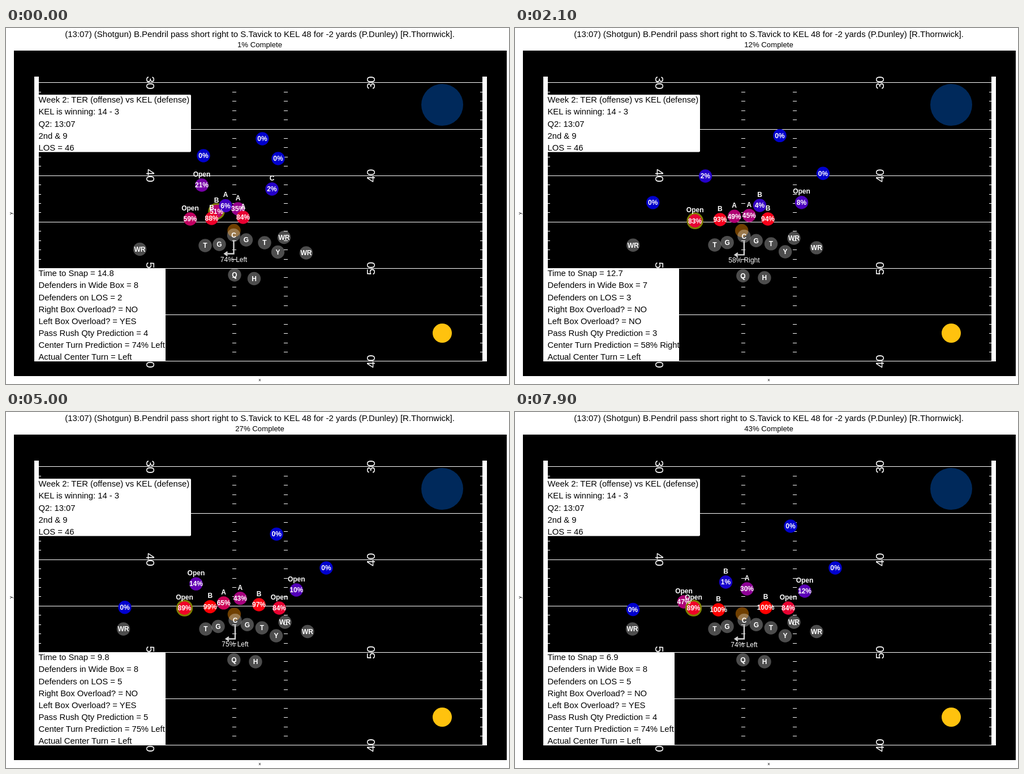
Recreate the animation shown at these times as an HTML page. Size 889x630 px, loop 8000 ms.

```html
<!DOCTYPE html>
<html lang="en">
<head>
<meta charset="utf-8">
<title>Pass rush prediction</title>
<style>
  html, body { margin: 0; width: 100%; height: 100%; overflow: hidden; background: #fff; }
  svg { display: block; width: 889px; height: 630px; }
  text { font-family: "Liberation Sans", Arial, sans-serif; }
  .mid { text-anchor: middle; }
  .info { font-size: 14.8px; white-space: pre; }
  .yard { font-size: 21px; fill: #fff; text-anchor: middle; }
  .axis { font-size: 8px; text-anchor: middle; }
  .tag { font-size: 12px; font-weight: bold; fill: #fff; text-anchor: middle; }
  .turn { font-size: 12px; fill: #fff; text-anchor: middle; }
  .lines { stroke: #fff; fill: none; }
</style>
</head>
<body>
<svg viewBox="0 0 889 630">
  <text class="mid" x="448.5" y="16" font-size="15">(13:07) (Shotgun) B.Pendril pass short right to S.Tavick to KEL 48 for -2 yards (P.Dunley) [R.Thornwick].</text>
  <text id="progress" class="mid" x="448.5" y="33.5" font-size="13.2"></text>
  <rect x="14" y="40" width="871" height="576"/>
  <path d="M50 86h8v504h-8zM842 86h8v504h-8z" fill="#fff"/>
  <g id="field"></g>
  <circle cx="771" cy="136" r="37" fill="#00295b"/>
  <circle cx="771" cy="540" r="17" fill="#ffc20e"/>
  <g id="panels"></g>
  <g id="discs"></g>
  <g id="labels"></g>
  <text class="axis" x="448.5" y="625">x</text>
  <text class="axis" transform="translate(11 328) rotate(-90)">y</text>
</svg>
<script>
const $ = id => document.getElementById(id);
const field = $('field'), panels = $('panels'), discs = $('discs'), labels = $('labels');
const R = 11.7;

function set(el, attrs) {
  for (const k in attrs) el.setAttribute(k, attrs[k]);
}
function add(parent, tag, attrs = {}, text = '') {
  const el = document.createElementNS('http://www.w3.org/2000/svg', tag);
  set(el, attrs);
  el.textContent = text;
  return parent.appendChild(el);
}

// Field: a line every five yards, hash marks between
const yardY = k => 96.9 + 16.433 * k;
let marks = '';
for (let k = 0; k <= 30; k++) {
  const y = Math.floor(yardY(k)) + .5;
  marks += k % 5 ? [55, 400, 491, 838].map(x => `M${x} ${y}h7`).join('') : `M58 ${y}H842`;
}
add(field, 'path', { class: 'lines', d: marks });
[30, 40, 50, 40].forEach((label, i) => {
  const y = yardY(i * 10);
  add(field, 'text', { class: 'yard', transform: `translate(247.6 ${y}) rotate(90)` }, label);
  add(field, 'text', { class: 'yard', transform: `translate(651.5 ${y}) rotate(-90)` }, label);
});

// Info panels
function panel(y, width, height, rows) {
  const box = add(panels, 'rect', { x: 53.5, y, width, height, rx: 2, fill: '#fff' });
  const texts = rows.map((row, i) =>
    add(panels, 'text', { class: 'info', x: 57.5, y: y + 14.3 + i * 21.15 }, row));
  return { box, texts };
}
panel(118, 273.5, 101.5, [
  'Week 2: TER (offense) vs KEL (defense)', 'KEL is winning: 14 - 3',
  'Q2: 13:07', '2nd & 9', 'LOS = 46']);
const stats = panel(425, 228.5, 165, Array(8).fill(''));

// Smooth walk through waypoints [step, x, y], coming to rest at the last
function walk(points) {
  const last = points.length - 1;
  const slope = (k, c) =>
    (points[k + 1][c] - points[k][c]) / (points[k + 1][0] - points[k][0]);
  const tangent = (k, c) => {
    if (k === last) return 0;
    const b = slope(k, c), a = k ? slope(k - 1, c) : b;
    return a * b > 0 ? 2 * a * b / (a + b) : 0;
  };
  return n => {
    if (n >= points[last][0]) return points[last].slice(1);
    const i = points.findIndex(p => p[0] > n) - 1;
    const h = points[i + 1][0] - points[i][0], u = (n - points[i][0]) / h, v = 1 - u;
    return [1, 2].map(c =>
      points[i][c] * v * v * (1 + 2 * u) + points[i + 1][c] * u * u * (3 - 2 * u)
      + h * u * v * (tangent(i, c) * v - tangent(i + 1, c) * u));
  };
}

// Exponential settling into a stance
const settle = (x0, y0, x1, y1) => n => {
  const rest = Math.exp(-n / 6.5);
  return [x1 + (x0 - x1) * rest, y1 + (y0 - y1) * rest];
};

// Rush odds rise with y: even at `half`, over a range set by `spread`
const defense = [];
function defender({ half = 333, spread = 7, marked }, ...points) {
  const ring = marked && add(discs, 'circle', { r: 14.7, fill: '#808000' });
  defense.push({
    half, spread, ring, pos: walk(points),
    disc: add(discs, 'circle', { r: R }),
    pct: add(labels, 'text', { class: 'tag' }),
    gap: add(labels, 'text', { class: 'tag' })
  });
}
defender({}, [0, 453, 196], [10, 463, 180], [42, 475, 218], [79, 487, 202]);
defender({}, [0, 481, 231], [10, 523, 243], [42, 566, 276]);
defender({ half: 337, spread: 18 }, [0, 349, 226], [21, 336.5, 262], [42, 341, 292.5], [79, 298.5, 336]);
defender({ half: 338, spread: 45 }, [0, 346, 278], [10, 291, 290], [30, 221.5, 323], [59, 208.5, 349.5]);
defender({ half: 350, spread: 17 }, [0, 470, 285], [10, 488.5, 301], [30, 514, 312], [79, 512, 317]);
defender({ half: 324, spread: 11, marked: true }, [0, 372, 324.4], [10, 335.5, 322.5], [26, 315.5, 347]);
defender({ half: 333.6 }, [0, 388, 314.5], [30, 387.5, 337], [59, 382.5, 338], [79, 372.5, 301]);
defender({ half: 338, spread: 30 }, [0, 410, 320], [10, 413, 331.5], [42, 414.5, 332], [79, 410, 313]);
defender({ half: 335.5 }, [0, 325.5, 338], [10, 363.5, 323], [21, 432.5, 314], [30, 469, 335], [44, 483, 347]);
defender({ half: 330, spread: 3 }, [0, 419, 335], [10, 426.5, 335], [21, 447, 338], [59, 447, 342], [79, 443, 346]);
defender({ half: 331, spread: 3 }, [0, 363.5, 337], [30, 362, 340], [79, 359.5, 350]);

const ball = add(discs, 'circle', { r: R, fill: '#6f3f00' });
const ballPos = walk([[0, 403, 358.5], [10, 395.5, 358.5], [30, 404.5, 358.5], [79, 401.5, 357]]);

const offense = [];
function blocker(name, ...stance) {
  const player = {
    pos: settle(...stance),
    disc: add(discs, 'circle', { r: R, fill: '#fff', 'fill-opacity': .3 }),
    tag: add(labels, 'text', { class: 'tag' }, name)
  };
  offense.push(player);
  return player;
}
const center = blocker('C', 402.5, 366.5, 405, 368.5);
const leftT = blocker('T', 352, 385, 353, 384);
const leftG = blocker('G', 377, 383, 375, 379.5);
const rightG = blocker('G', 424.5, 375, 426.3, 376.3);
const rightT = blocker('T', 457, 380, 452.3, 382);
const tight = blocker('Y', 480.5, 396.5, 477.5, 396);
blocker('WR', 491.5, 370.5, 493, 372);
blocker('WR', 530.5, 398, 533, 388.5);
blocker('WR', 236.5, 391.5, 207.5, 384);
blocker('Q', 404, 437, 402.8, 438.5);
blocker('H', 438.5, 443.5, 441, 442);

const arrow = add(discs, 'path', { fill: 'none', stroke: '#d3d3d3', 'stroke-width': 2.4 });
const turn = add(labels, 'text', { class: 'turn' });

const place = (disc, x, y) => set(disc, { cx: x, cy: y });
const move = (text, x, y) => set(text, { x, y: y + 4.3 });

function gapName(x, n) {
  const lineX = player => player.pos(n)[0];
  if (x < lineX(leftT) || x > lineX(tight)) return 'Open';
  if (x > lineX(rightT)) return 'C';
  return x < lineX(leftG) || x > lineX(rightG) ? 'B' : 'A';
}

function rushOdds(d, y, wide) {
  const cover = Math.min(1, Math.max(0, (145 - wide) / 40));
  return Math.round(100 * cover / (1 + Math.exp((d.half - y) / d.spread)));
}

function draw(n) {
  const [cx, cy] = center.pos(n);
  let inBox = 0, onLine = 0, rushers = 0, leftSide = 0;

  for (const d of defense) {
    const [x, y] = d.pos(n), wide = Math.abs(x - cx);
    const rush = rushOdds(d, y, wide);
    const boxed = y > 270 && wide < 130;
    if (boxed) {
      inBox++;
      if (y > 335.5) onLine++;
      if (x < cx) leftSide++;
    }
    if (rush > 50) rushers++;
    if (d.ring) place(d.ring, x, y);
    place(d.disc, x, y);
    d.disc.style.fill = `color-mix(in lab, red ${rush}%, mediumblue)`;
    move(d.pct, x, y);
    d.pct.textContent = rush + '%';
    move(d.gap, x, y - 19.5);
    d.gap.textContent = boxed ? gapName(x, n) : '';
  }
  for (const o of offense) {
    const [x, y] = o.pos(n);
    place(o.disc, x, y);
    move(o.tag, x, y);
  }
  place(ball, ...ballPos(n));

  const overload = leftSide > 3;
  const call = overload ? 70 + rushers + '% Left' : '58% Right';
  set(arrow, { d: `M${cx} ${cy + 9}v24h-16m5 -3.5l-5 3.5l5 3.5` });
  move(turn, cx, cy + 42.7);
  turn.textContent = call;

  $('progress').textContent = Math.round((n + 1) / 1.87) + '% Complete';
  set(stats.box, { width: overload ? 228.5 : 236.5 });
  [
    'Time to Snap = ' + (14.8 - n / 10).toFixed(1),
    'Defenders in Wide Box = ' + inBox,
    'Defenders on LOS = ' + onLine,
    'Right Box Overload? = NO',
    'Left Box Overload? = ' + (overload ? 'YES' : 'NO'),
    'Pass Rush Qty Prediction = ' + rushers,
    'Center Turn Prediction = ' + call,
    'Actual Center Turn = Left'
  ].forEach((row, i) => { stats.texts[i].textContent = row; });
}

const start = performance.now();
let shown = -1;
function tick() {
  const n = Math.floor((performance.now() - start) % 8000 / 100);
  if (n !== shown) draw(shown = n);
  requestAnimationFrame(tick);
}
tick();
</script>
</body>
</html>
```
